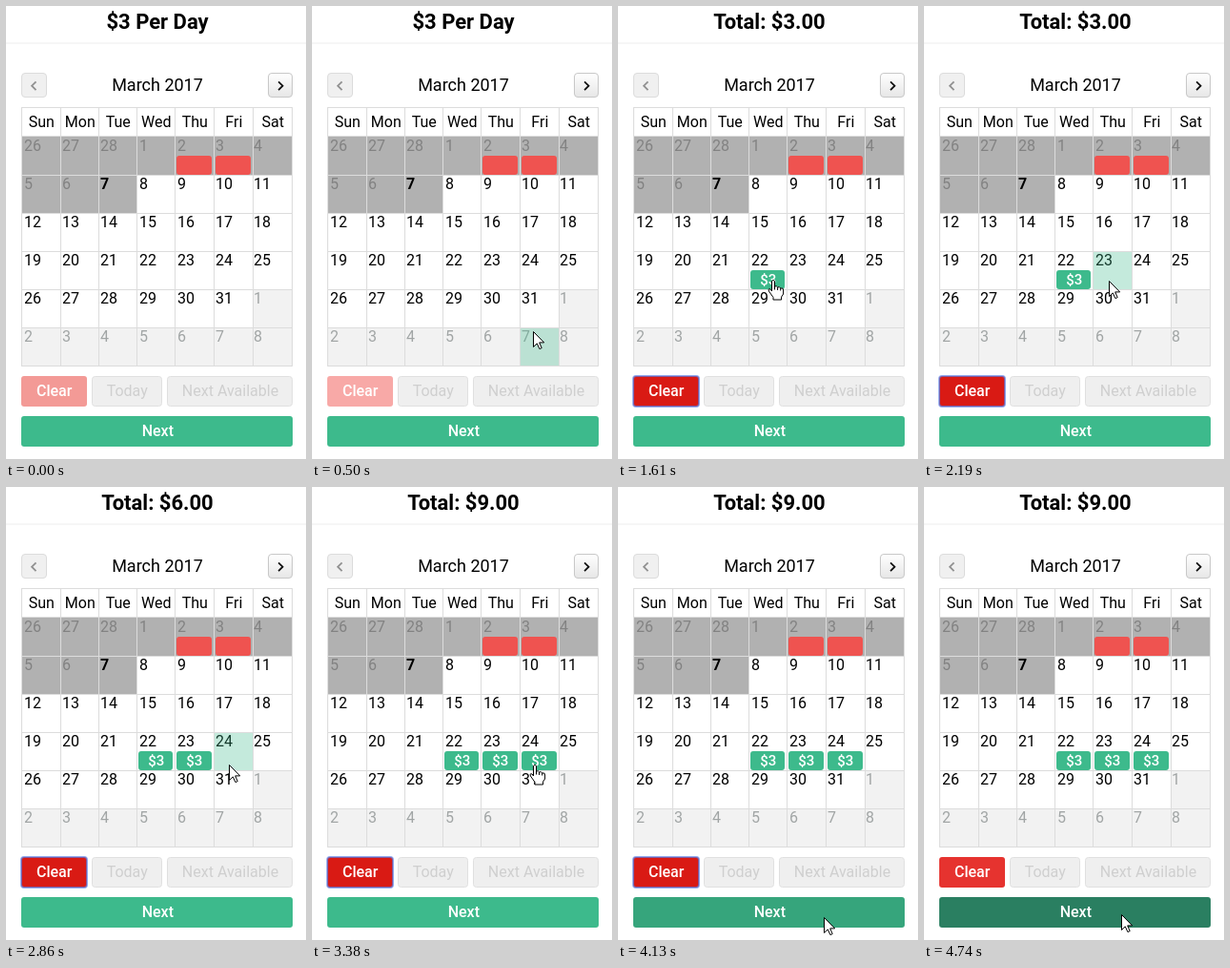
Recreate the animation shown at these times as an HTML page with a canvas. Size 315 by 475 pixels, loop 4780 ms.

```html
<!DOCTYPE html>
<html lang="en">
<head>
<meta charset="utf-8">
<title>Booking calendar</title>
<style>
  html, body { margin: 0; width: 100%; height: 100%; overflow: hidden; background: #fff; }
  canvas { display: block; width: 315px; height: 475px; }
</style>
</head>
<body>
<canvas id="stage"></canvas>
<script>
const W = 315, H = 475, LOOP = 4780, HOVER_LAG = 60;
const canvas = document.getElementById('stage');
const ctx = canvas.getContext('2d', { alpha: false });
const dpr = window.devicePixelRatio || 1;
canvas.width = W * dpr;
canvas.height = H * dpr;

const GREEN = [61, 186, 140];
const weekdays = ['Sun', 'Mon', 'Tue', 'Wed', 'Thu', 'Fri', 'Sat'];

// Grid lines: 40 px cells, the last columns take the spare pixels
const colX = i => 16 + 40 * i + (i && Math.max(1, i - 3));
const rowY = i => 136 + 40 * i + (i && 1);
const colW = i => colX(i + 1) - colX(i);
const rowH = i => rowY(i + 1) - rowY(i);

// Moments at which Wed, Thu and Fri of the fourth week get booked
const clicks = [1210, 2220, 3120];
const NEXT_CLICK = 4610;

// Pointer strokes, each a curve that begins where the last one ended
const entry = { at: 20, pos: [286, 474] };
const strokes = [
  { from: 20, to: 930, bend: [250, 317], end: [163, 287] },
  { from: 1600, to: 1960, bend: [178, 288], end: [194, 288] },
  { from: 2480, to: 2880, bend: [214, 289], end: [234, 291] },
  { from: 3530, to: 4250, bend: [275, 479], end: [207, 448] }
];

const arrow = new Path2D('M.5 .5V16.5L4.3 12.9L6.9 18.6L9.2 17.6L6.7 11.9H11.7Z');
const hand = new Path2D('M-1.5 1.5Q0-.8 1.5 1.5V7.2Q3.4 5.8 4.6 8Q6.6 6.8 7.7 9' +
  'Q10.6 8 10.6 11V15L8.6 18V21H0V18.5L-4.6 12Q-5.4 8.8-3 10L-1.5 12Z');
const knuckles = new Path2D('M1.5 7V10.5M4.6 8V11M7.7 9V11.5');

const fade = (t, start, length) => Math.min(1, Math.max(0, (t - start) / length));
const smooth = k => k * k * (3 - 2 * k);
const mix = (a, b, k) => a.map((v, i) => v + (b[i] - v) * k);
const rgb = c => `rgb(${c.map(Math.round)})`;

function pointerAt(t) {
  let pos = entry.pos;
  for (const { from, to, bend, end } of strokes) {
    if (t < from) break;
    const u = smooth(fade(t, from, to - from));
    pos = mix(mix(pos, bend, u), mix(bend, end, u), u);
  }
  return pos;
}

function text(str, x, y, size, color, weight = 400, align = 'center') {
  ctx.font = `${weight} ${size}px Roboto, sans-serif`;
  ctx.textAlign = align;
  ctx.fillStyle = color;
  ctx.fillText(str, x, y);
}

function box(x, y, w, h, r, fill, stroke, line = 1) {
  ctx.beginPath();
  ctx.roundRect(x, y, w, h, r);
  if (fill) {
    ctx.fillStyle = fill;
    ctx.fill();
  }
  if (stroke) {
    ctx.strokeStyle = stroke;
    ctx.lineWidth = line;
    ctx.stroke();
  }
}

function chevron(x, dir, color) {
  ctx.beginPath();
  ctx.moveTo(x - 2.2 * dir, 79.3);
  ctx.lineTo(x + 2.2 * dir, 83.7);
  ctx.lineTo(x - 2.2 * dir, 88.1);
  ctx.strokeStyle = color;
  ctx.lineWidth = 1.8;
  ctx.stroke();
}

function header(total) {
  ctx.fillStyle = '#f6f6f6';
  ctx.fillRect(0, 38, W, 2);
  text(total ? `Total: $${total}.00` : '$3 Per Day', 159, 24, 22, '#000', 700);
  text('March 2017', 159, 89, 18, '#000');
  box(16.5, 70.5, 26, 25, 3.5, '#f0f0f0', '#dcdcdc');
  chevron(29.3, -1, '#909090');
  const shade = ctx.createLinearGradient(0, 70, 0, 96);
  shade.addColorStop(0, '#fff');
  shade.addColorStop(1, '#e6e6e6');
  box(275.5, 70.5, 25, 25, 3.5, shade, '#c8c8c8');
  chevron(288.3, 1, '#111');
}

function badge(col, row, color, label) {
  const x = colX(col) + 2, y = rowY(row + 1) - 20;
  box(x, y, colW(col) - 4, 20, 3, color);
  if (label) text(label, x + 10.3, y + 15, 15, '#fff', 500, 'left');
}

function cellAt([x, y]) {
  const find = (line, n, v) => {
    for (let i = 0; i < n; i++) if (v > line(i) && v <= line(i + 1)) return i;
    return -1;
  };
  const col = find(colX, 7, x), row = find(rowY, 6, y);
  return col < 0 || row < 0 ? null : { col, row };
}

function calendar(t, booked) {
  const cell = (c, r, color) => {
    ctx.fillStyle = color;
    ctx.fillRect(colX(c) + 1, rowY(r) + 1, colW(c) - 1, rowH(r) - 1);
  };
  ctx.fillStyle = '#dcdcdc';
  ctx.fillRect(16, 106, 285, 272);
  weekdays.forEach((name, c) => {
    ctx.fillStyle = '#fff';
    ctx.fillRect(colX(c) + 1, 107, colW(c) - 1, 29);
    text(name, colX(c) + colW(c) / 2 + 0.8, 127, 16, '#000');
  });

  for (let i = 0; i < 42; i++) {
    const c = i % 7, r = Math.floor(i / 7), n = i - 2;
    const past = i < 10, later = n > 31, today = n === 7;
    const label = n < 1 ? n + 28 : later ? n - 31 : n;
    cell(c, r, past ? '#b1b1b1' : later ? '#f2f2f2' : '#fff');
    const color = today ? '#000' : past ? '#828282' : later ? '#a1a5a5' : '#000';
    text(String(label), Math.round(19 + 40.2 * c), 152 + 40 * r, 16, color, today ? 700 : 400, 'left');
  }

  const over = t > entry.at + HOVER_LAG && cellAt(pointerAt(t - HOVER_LAG));
  const taken = over && over.row === 3 && booked.includes(over.col);
  if (over && !taken) cell(over.col, over.row, `rgba(${GREEN},.3)`);

  for (const col of [4, 5]) badge(col, 0, '#ef5350');
  for (const col of booked) badge(col, 3, rgb(GREEN), '$3');
}

function clearColor(t) {
  const idle = mix([243, 154, 150], [248, 169, 167], fade(t, 20, 180));
  const focused = mix(idle, [217, 26, 20], fade(t, clicks[0], 170));
  return rgb(mix(focused, [230, 51, 47], fade(t, NEXT_CLICK, 120)));
}

function nextColor(t) {
  const hover = fade(t, 120, 100) - fade(t, 260, 120) + fade(t, 3930, 150);
  const hovered = mix(GREEN, [54, 165, 124], hover);
  return rgb(mix(hovered, [42, 127, 97], fade(t, NEXT_CLICK, 120)));
}

function buttons(t) {
  box(16, 388, 69, 32, 3, clearColor(t));
  const focus = t >= clicks[0] && t < NEXT_CLICK + 30;
  if (focus) box(16, 388, 69, 32, 3, null, 'rgba(85,125,230,.65)', 2);
  text('Clear', 50.7, 409, 16, '#fff', 500);
  box(90.5, 388.5, 73, 31, 3, '#efefef', '#e0e0e0');
  text('Today', 127.2, 409, 16, '#cfcfcf');
  box(169.5, 388.5, 131, 31, 3, '#efefef', '#e0e0e0');
  text('Next Available', 235.5, 409, 16, '#cfcfcf');
  box(16, 430, 285, 32, 3, nextColor(t));
  text('Next', 159.3, 451, 16, '#fff', 500);
}

function pointer(t, booked) {
  if (t < entry.at) return;
  const [x, y] = pointerAt(t);
  const onBadge = y > 277 && y < 297 &&
    booked.some(c => x > colX(c) + 2 && x < colX(c + 1) - 2);
  ctx.save();
  ctx.translate(Math.round(x), Math.round(y));
  ctx.lineWidth = 1;
  ctx.lineJoin = 'round';
  ctx.fillStyle = '#fff';
  ctx.strokeStyle = '#000';
  const shape = onBadge ? hand : arrow;
  ctx.fill(shape);
  ctx.stroke(shape);
  if (onBadge) ctx.stroke(knuckles);
  ctx.restore();
}

function draw(t) {
  const booked = clicks.map((at, i) => t >= at ? i + 3 : 0).filter(Boolean);
  ctx.setTransform(dpr, 0, 0, dpr, 0, 0);
  ctx.fillStyle = '#fff';
  ctx.fillRect(0, 0, W, H);
  header(booked.length * 3);
  calendar(t, booked);
  buttons(t);
  pointer(t, booked);
}

const start = performance.now();
function frame() {
  draw((performance.now() - start) % LOOP);
  requestAnimationFrame(frame);
}
frame();
</script>
</body>
</html>
```
